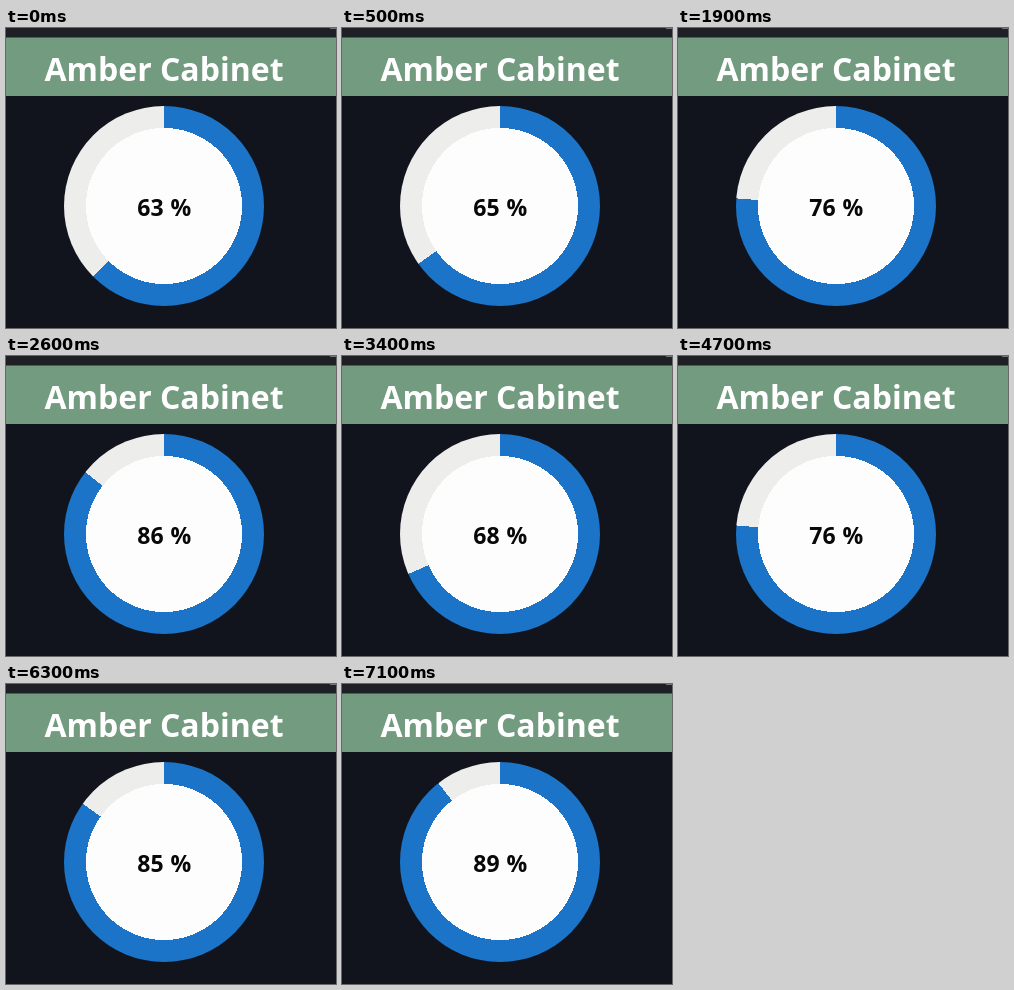
Write an HTML page that moves like this. It is 330 px wide and 300 px high and loops after 7200 ms.

```html
<!DOCTYPE html>
<html lang="en">
<head>
<meta charset="utf-8">
<title>Progress ring</title>
<style>
  html, body { margin: 0; width: 100%; height: 100%; overflow: hidden; background: #11141c; }
  svg { position: absolute; left: 0; top: 0; width: 330px; height: 300px; }
  text { font-family: "Open Sans", "Noto Sans", sans-serif; font-weight: 700; text-anchor: middle; }
  #ring {
    position: absolute; left: 58px; top: 78px; width: 200px; height: 200px; border-radius: 50%;
    background:
      radial-gradient(circle, #fcfdfc 78px, transparent 0),
      conic-gradient(#1b74c8 var(--value), #ededec 0);
  }
</style>
</head>
<body>
<div id="ring"></div>
<svg viewBox="0 0 330 300">
  <rect width="330" height="10" fill="#1f2025"/>
  <rect x="324" width="6" height="1" fill="#777"/>
  <rect y="9.5" width="330" height="58.5" fill="#739b80"/>
  <text x="158" y="53" font-size="32" fill="#fff">Amber Cabinet</text>
  <text id="label" x="158.3" y="187.5" font-size="23" word-spacing="1" fill="#080808"></text>
</svg>
<script>
  const LOOP = 7200, STEP = 100, PERIOD = 1000, LEAD = 380, MOVE = 830;
  const levels = [60.6, 65.2, 73, 85.6, 68.3, 76.3, 79, 85.4, 91.9];
  const ring = document.getElementById("ring");
  const label = document.getElementById("label");

  // Each period eases to the next level, then rests.
  function valueAt(time) {
    const shifted = time + LEAD;
    const i = Math.floor(shifted / PERIOD);
    const p = Math.min(1, shifted % PERIOD / MOVE);
    const ease = (1 - Math.cos(Math.PI * p)) / 2;
    return levels[i] + (levels[i + 1] - levels[i]) * ease;
  }

  function draw() {
    const time = Math.floor(performance.now() % LOOP / STEP) * STEP;
    const value = valueAt(time);
    ring.style.setProperty("--value", `${value}%`);
    label.textContent = `${Math.round(value)} %`;
    requestAnimationFrame(draw);
  }
  draw();
</script>
</body>
</html>
```
